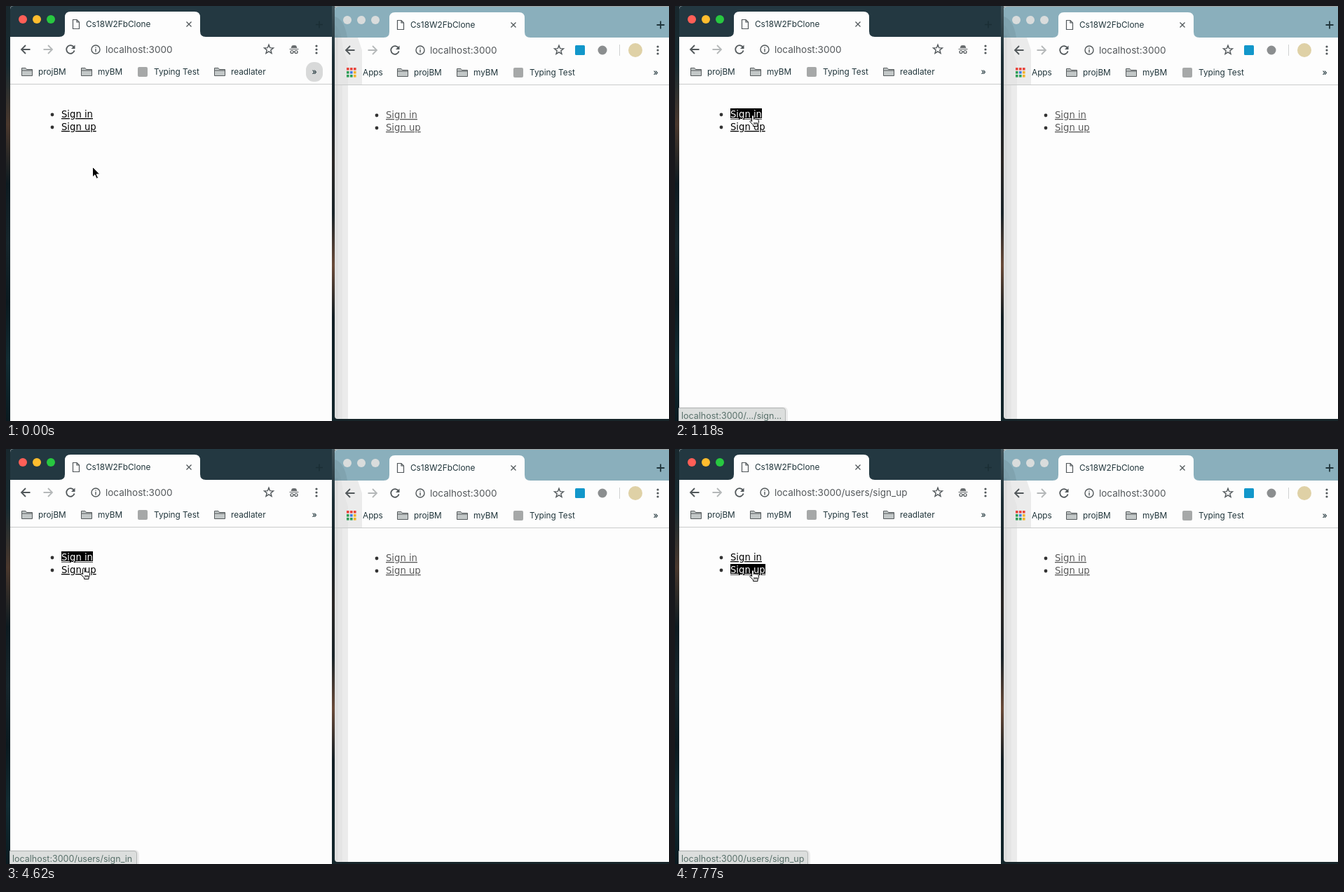
Animation, 946 px wide and 592 px high, one loop 8000 ms. Source, as an HTML page:

```html
<!DOCTYPE html>
<html lang="en">
<head>
<meta charset="utf-8">
<title>Two browser windows</title>
<style>
  html, body { margin: 0; width: 100%; height: 100%; overflow: hidden; }
  svg { display: block; }
  text { font-family: Inter, Roboto, sans-serif; font-size: 11.8px; fill: #20353b; white-space: pre; }
  .url { font-size: 13.5px; fill: #54585b; }
  .status { font-size: 12.5px; fill: #58706a; }
  .link { font-family: "DejaVu Sans", Verdana, sans-serif; font-size: 13.2px; text-decoration: underline; }
  .line { fill: none; stroke: #51575a; stroke-width: 1.8; }
</style>
</head>
<body>
<svg id="stage" width="946" height="592" viewBox="0 0 946 592"></svg>
<script>
const LOOP = 8000;
const stage = document.getElementById('stage');

const rect = (x, y, w, h, fill, more = '') =>
  `<rect x="${x}" y="${y}" width="${w}" height="${h}" fill="${fill}" ${more}/>`;
const disc = (x, y, r, fill) => `<circle cx="${x}" cy="${y}" r="${r}" fill="${fill}"/>`;
const label = (x, y, s, more = '') => `<text x="${x}" y="${y}" ${more}>${s}</text>`;
const path = (d, more = 'class="line"') => `<path d="${d}" ${more}/>`;
const at = (x, y, body, more = '') => `<g transform="translate(${x} ${y})" ${more}>${body}</g>`;
const gradient = (id, colors) =>
  `<linearGradient id="${id}" x1="0" y1="0" x2="0" y2="1">${colors.map((c, i) =>
    `<stop offset="${i / (colors.length - 1)}" stop-color="${c}"/>`).join('')}</linearGradient>`;

const folder = (x, name) =>
  path(`M${x + .5} 99.5V88.5H${x + 6}L${x + 7.5} 90.5H${x + 15.5}V99.5ZM${x + .5} 92H${x + 15.5}`,
    'fill="#c3c8c8" stroke="#565b5d" stroke-width="1"') + label(x + 24, 98, name);
const typingTest = x => rect(x, 87, 14, 14, '#a6a8a8', 'rx="2"') + label(x + 23, 98, 'Typing Test');
const dots = x => [57, 62, 67].map(y => disc(x, y, 1.6, '#51575a')).join('');
const chevrons = x => label(x, 97.5, '»', 'text-anchor="middle" font-weight="500"');

function star(x, y) {
  let d = '';
  for (let i = 0; i < 10; i++) {
    const r = i % 2 ? 2.9 : 6.8, a = i * Math.PI / 5;
    d += `${i ? 'L' : 'M'}${x + r * Math.sin(a)} ${y - r * Math.cos(a)}`;
  }
  return path(d + 'Z', 'class="line" style="stroke-width:1.4"');
}

// Shared window frame; both windows use the same local coordinates.
function frame({ width, height, bar, lights, shade = '', links, urlId = '' }) {
  const link = (y, s, id) =>
    disc(66, y - 4, 2.4, '#333') +
    (id ? rect(79, y - 13, id === 'in' ? 45 : 50, 16, '#000', `id="${id}Box"`) : '') +
    label(79, y, s, `class="link" style="fill:${links}" id="${id}"`);
  return rect(6, 0, width, height, '#fdfdfd', 'rx="4"') +
    path(`M6 44V5Q6 0 11 0H${6 + width}V44Z`, `fill="${bar}"`) +
    path('M76 44Q84 44 84 36V16Q84 8 92 8H269Q277 8 277 16V36Q277 44 285 44Z', 'fill="#fdfdfd"') +
    shade +
    lights.map((c, i) => disc(24 + i * 20, 19, 6, c)).join('') +
    path('M95.5 19.5H101L104.5 23V32.5H95.5ZM101 19.5V23H104.5', 'class="line" style="stroke-width:1.2"') +
    label(114, 30, 'Cs18W2FbClone') +
    path('M257.5 22.5L264.5 29.5M264.5 22.5L257.5 29.5', 'class="line" style="stroke-width:1.3"') +
    path('M34.5 62H22.5M28 56L22 62L28 68') +
    path('M53.5 62H65.5M60 56L66 62L60 68', 'class="line" style="stroke:#b5b8b9"') +
    path('M97 59A5.8 5.8 0 1 0 97.6 63.5') +
    path('M98.5 55.5V61H93Z', 'fill="#51575a"') +
    path('M134 62A6 6 0 1 1 122 62A6 6 0 1 1 134 62M128 61V65.5M128 58.4V59.8', 'class="line" style="stroke-width:1.4"') +
    label(142, 67, 'localhost:3000', `class="url" id="${urlId}"`) +
    rect(6, 111, width, 1, '#c9cbcb') +
    link(159, 'Sign in', urlId && 'in') + link(177, 'Sign up', urlId && 'up');
}

const incognito =
  path('M406.5 60L408 56.5Q411 55.5 414 56.5L415.5 60ZM404.5 61H417.5V62H404.5Z', 'fill="#65696b"') +
  path('M410 65.5A2 2 0 1 1 406 65.5A2 2 0 1 1 410 65.5M416 65.5A2 2 0 1 1 412 65.5A2 2 0 1 1 416 65.5M410 65H412',
    'class="line" style="stroke-width:1.2"');

const leftWindow = frame({
    width: 459, height: 600, bar: '#233841', lights: ['#ff5f57', '#ffbd2e', '#28c840'], links: '#000', urlId: 'url'
  }) +
  path('M442 26.5H452M447 21.5V31.5', 'fill="none" stroke="#1b2e35" stroke-width="1.6"') +
  star(375, 62) + incognito + dots(443) +
  folder(22, 'projBM') + folder(107, 'myBM') + typingTest(188) + folder(297, 'readlater') +
  rect(428, 80, 24, 28, '#d8d9d9', 'rx="11" id="pill"') + chevrons(440);

const shade =
  path('M6 14Q20 18 24 44H39L45 62V111H25V588H6Z', 'fill="#000" opacity=".07"') +
  path('M6 26Q15 30 18 60L25 80V111H17V588H6Z', 'fill="#000" opacity=".025"') +
  rect(6, 40, 5, 547, '#000', 'opacity=".03"');

const gridColors = ['#e8453c', '#e8453c', '#e8453c', '#2e9e56', '#3f7de0', '#f2b32c', '#2e9e56', '#2e9e56', '#f2b32c'];
const apps = gridColors.map((c, i) => rect(23 + i % 3 * 5, 87 + Math.floor(i / 3) * 5, 3.6, 3.6, c)).join('');

const rightWindow = frame({
    width: 480, height: 588, bar: '#8aafbc', lights: ['#d9dcdc', '#d9dcdc', '#d9dcdc'], shade, links: '#595959'
  }) +
  path('M465.5 26H476.5M471 20.5V31.5', 'fill="none" stroke="#20353b" stroke-width="1.8"') +
  star(326, 62) + rect(349, 55, 14, 14, '#1297ca', 'rx="1.5"') + disc(388, 62, 6.5, '#8b8e8f') +
  rect(412, 54, 1, 16, '#d0d2d2') + disc(435, 62, 10, '#dfd1a6') + dots(467) +
  apps + label(46, 98, 'Apps') + folder(95, 'projBM') + folder(180, 'myBM') + typingTest(261) + chevrons(464);

const arrow = path('M.5 .5V15L3.8 11.9L6.2 17.3L8.6 16.2L6.3 11H10.8Z',
  'id="arrow" fill="#000" stroke="#fff" stroke-width="1"');
const hand = path('M4.6 10V2.2a1.4 1.4 0 0 1 2.8 0V6.7a1.3 1.3 0 0 1 2.5 .2a1.3 1.3 0 0 1 2.4 .5' +
  'a1.1 1.1 0 0 1 2.1 .9V11.5L13 14.3V16.5H6.6V14.8L2.1 10.2a1.3 1.3 0 0 1 2-1.5ZM8 11v3M10 11v3M12 11v3',
  'id="hand" fill="#fff" stroke="#000" stroke-width="1"');

stage.innerHTML = '<defs>' +
  gradient('edge', ['#18272d', '#182b31', '#4a382d', '#0e1b21', '#16262c', '#0b1a20', '#122c33', '#0a1a20']) +
  gradient('gap', ['#42545b', '#1c2e35', '#172127', '#2a2725', '#1a2429', '#6a4a38', '#121e24', '#0e2228', '#14262b']) +
  '</defs>' +
  rect(0, 0, 946, 592, '#17252a') + rect(0, 0, 8, 592, 'url(#edge)') + rect(463, 0, 8, 592, 'url(#gap)') +
  rect(469, 0, 477, 2, '#a2a4a3') +
  at(463, 1, rightWindow) + leftWindow +
  at(0, 0,
    path('', 'id="bubbleShadow" fill="#000" opacity=".07"') +
    path('', 'id="bubble" fill="#dcdedd" stroke="#b4b7b6"') +
    label(9, 589, '', 'class="status" id="statusText"'), 'id="status"') +
  at(0, 0, arrow + hand, 'id="cursor"');

const $ = id => document.getElementById(id);
const show = (id, on) => $(id).setAttribute('visibility', on ? 'visible' : 'hidden');
const latest = (steps, t) => steps.filter(s => s[0] <= t).pop();

const cursorSteps = [
  [0, 123, 229, 'arrow'], [290, 121, 178, 'arrow'], [440, 111, 163, 'hand'], [590, 109, 160, 'hand'],
  [730, 105, 155, 'hand'], [4620, 105, 169, 'hand'], [4770, 105, 173, 'hand'], [5220, 105, 172, 'hand']
];
const hoverSteps = [[0, ''], [440, 'up'], [590, 'in'], [4770, 'up']];
const statusSteps = [
  [0, 0, ''], [1180, 158, '/.../sign...'], [2230, 187, '/.../sign...'],
  [2380, 187, '/users/sign_in'], [4770, 190, '/users/sign_up']
];

function draw(t) {
  const [, x, y, kind] = latest(cursorSteps, t);
  $('cursor').setAttribute('transform', `translate(${x} ${y})`);
  for (const id of ['arrow', 'hand']) show(id, id === kind);

  const hover = latest(hoverSteps, t)[1];
  for (const id of ['in', 'up']) {
    show(id + 'Box', id === hover);
    $(id).style.fill = id === hover ? '#fff' : '#000';
  }

  const [, right, page] = latest(statusSteps, t);
  show('status', right > 0);
  $('bubble').setAttribute('d', `M5.5 593V573.5H${right - 4}Q${right - .5} 573.5 ${right - .5} 577V593Z`);
  $('bubbleShadow').setAttribute('d', `M6 593V572H${right - 2}Q${right + 3} 573 ${right + 3} 579V593Z`);
  $('statusText').textContent = 'localhost:3000' + page;

  show('pill', t < 290);
  $('url').textContent = 'localhost:3000' + (t >= 7770 ? '/users/sign_up' : '');
}

const start = performance.now();
function tick() {
  draw((performance.now() - start) % LOOP);
  requestAnimationFrame(tick);
}
tick();
</script>
</body>
</html>
```
